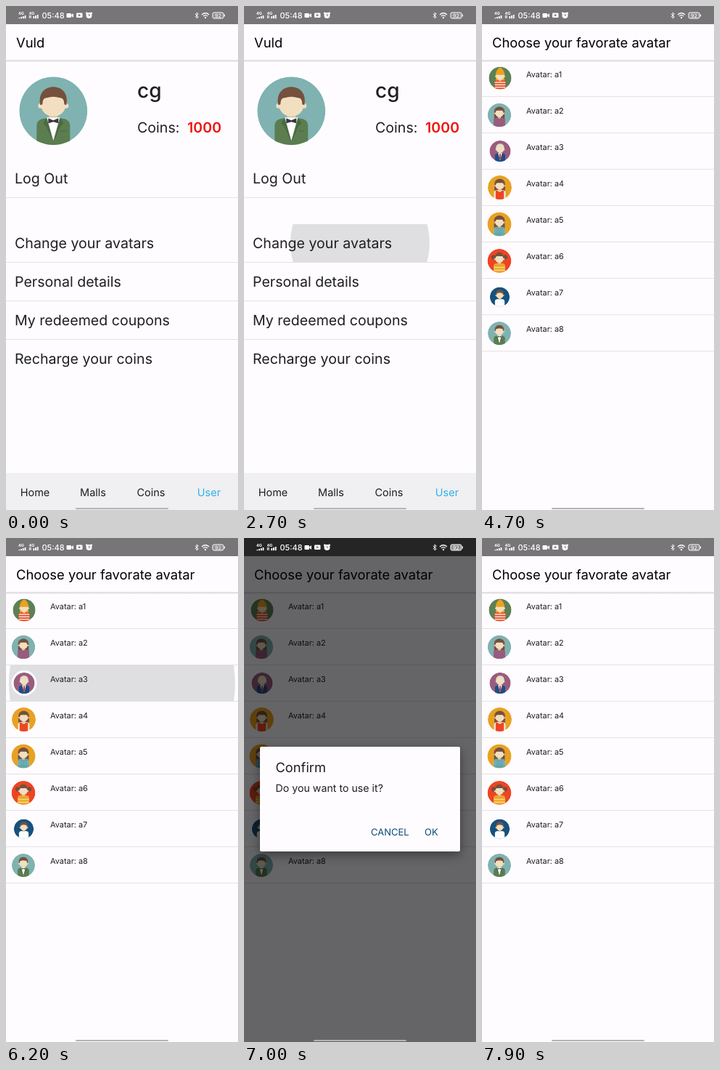
Write an HTML page that moves like this. It is 320 px wide and 693 px high and loops after 8 s.

```html
<!DOCTYPE html>
<html lang="en">
<head>
<meta charset="utf-8">
<title>Avatar picker</title>
<style>
  html, body { margin: 0; width: 100%; height: 100%; overflow: hidden; background: #fefcff; }
  svg { display: block; width: 100%; height: 100%; }
  text { font-family: Inter, Roboto, sans-serif; font-optical-sizing: none; text-rendering: geometricPrecision; fill: #1f1e21; }
  .item { font-size: 19.6px; }
  .title { font-size: 18.4px; fill: #000; }
  .tab { font-size: 14.5px; text-anchor: middle; }
  .small { font-size: 10.9px; }
  .button { font-size: 13px; fill: #0b4b72; }
  #status text { fill: #fff; }
</style>
</head>
<body>
<svg viewBox="0 0 320 693">
  <defs>
    <clipPath id="disc"><circle r="47"/></clipPath>
    <clipPath id="homeRow"><rect y="300" width="320" height="52"/></clipPath>
    <clipPath id="listRow"><rect y="175" width="320" height="49.5"/></clipPath>
    <linearGradient id="fall" x2="0" y2="1">
      <stop stop-color="#cfced1"/><stop offset="1" stop-color="#fefcff"/>
    </linearGradient>
    <pattern id="dots" width="6" height="6" patternUnits="userSpaceOnUse">
      <rect width="6" height="6" fill="#4f9aa0"/><circle cx="3" cy="3" r="1.5" fill="#e3efe9"/>
    </pattern>
  </defs>
  <g id="home"></g>
  <g id="list"></g>
  <rect id="dim" y="25" width="320" height="668" opacity="0"/>
  <g id="status"></g>
  <rect x="96" y="690" width="128" height="2" rx="1" fill="#b3b2b5"/>
  <g id="dialog"></g>
</svg>
<script>
const $ = id => document.getElementById(id);
const paper = '#fefcff';
const label = (x, y, s, cls, more = '') => `<text x="${x}" y="${y}" class="${cls}" ${more}>${s}</text>`;
const box = (x, y, w, h, fill, more = '') => `<rect x="${x}" y="${y}" width="${w}" height="${h}" fill="${fill}" ${more}/>`;
const path = (d, fill) => `<path d="${d}" fill="${fill}"/>`;
const dot = (x, y, r, fill) => `<circle cx="${x}" cy="${y}" r="${r}" fill="${fill}"/>`;
const rule = y => box(0, y - 0.5, 320, 1, '#e3e2e5');
const header = s => box(0, 25, 320, 50, paper) + box(0, 74.5, 320, 3, 'url(#fall)') + label(14, 57, s, 'title');

// Avatar parts, drawn on a disc of radius 47
const skin = '#f1dfc0', brown = '#75503c', green = '#5b7d50', lapel = '#4a6a42';
const shortHair = c => path('M-18-8C-21-24-12-33 0-33S21-24 18-8L15-9C15-15 13-18 9-18Q0-21-9-18C-13-18-15-15-15-9Z', c);
const longHair = path('M-21 24V-14C-21-40 21-40 21-14V24Z', brown);
const fringe = path('M-18-6C-21-42 21-42 18-6L15-12Q14-18 9-18H-9Q-14-18-15-12Z', brown);
const vest = path('M-9 9L0 41L9 9Z', '#fff');
const stripes = (c, ys) => ys.map(y => box(-22, y, 44, 4.5, c)).join('');

const avatars = [
  { x: 25, y: 99, r: 15.6, bg: '#5d8055', body: '#ee4826',
    back: path('M-18 18V-14H18V18Z', '#e8a32b'),
    front: stripes('#f6ead6', [16, 26, 36]) + path('M-19-13C-18-30-6-44 0-44S18-30 19-13Z', '#efa01e') },
  { x: 24, y: 150, r: 16.2, bg: '#7fb2b1', body: '#995b80', back: longHair, front: fringe },
  { x: 25, y: 199.5, r: 14.6, bg: '#9a5c7f', body: '#17518a',
    front: vest + path('M-3 11H3L4 32L0 39L-4 32Z', '#e23f2b') + shortHair('#e6dcc9') },
  { x: 24.5, y: 249.5, r: 16.5, bg: '#e9a122', body: '#f0e3cc', back: longHair,
    front: path('M-16 47V12H-9Q0 24 9 12H16V47Z', '#ee4524') + fringe },
  { x: 24, y: 300, r: 16.6, bg: '#e9a122', body: 'url(#dots)', back: longHair, front: fringe },
  { x: 24, y: 350.3, r: 16.4, bg: '#ee4424', body: '#eda526',
    back: dot(-23, -14, 9, brown) + dot(23, -14, 9, brown),
    front: stripes('#f5d58a', [24, 35]) + fringe },
  { x: 24.5, y: 400, r: 13.6, bg: '#16517f', body: '#fdfcfe', front: shortHair('#7c5139') },
  { x: 24, y: 450, r: 16, bg: '#7fb2b1', body: green,
    front: vest + path('M-10 10L-14 17L-10 21L0 43L-8 16Z', lapel) + path('M10 10L14 17L10 21L0 43L8 16Z', lapel)
      + path('M-7 10L0 13L7 10V17L0 15L-7 17Z', '#37373f') + box(10, 27, 8, 1.2, lapel) + shortHair(brown) }
];

const avatar = ({ x, y, r, bg, body, back = '', front }) =>
  `<g transform="translate(${x} ${y}) scale(${r / 47})"><g clip-path="url(#disc)">`
  + dot(0, 0, 47, bg) + back
  + path('M-23 47V21C-23 13-18 11-10 10H10C18 11 23 13 23 21V47Z', body)
  + path('M-6 2H6V11Q0 16-6 11Z', '#d8c19e')
  + dot(-17.5, -7, 3.5, skin) + dot(17.5, -7, 3.5, skin)
  + box(-17, -30, 34, 37.5, skin, 'rx="16"')
  + front + '</g></g>';

const rows = ['Change your avatars', 'Personal details', 'My redeemed coupons', 'Recharge your coins'];
const tabs = ['Home', 'Malls', 'Coins', 'User'];

$('home').innerHTML = box(0, 0, 320, 693, paper) + header('Vuld')
  + avatar({ ...avatars[7], x: 65.3, y: 144.2, r: 47 })
  + label(181, 126, 'cg', '', 'font-size="28" font-weight="500"')
  + label(181, 174, 'Coins:', 'item')
  + label(250, 174, '1000', 'item', 'font-weight="600" style="fill:#f0140c"')
  + '<circle id="homeRipple" cx="160" cy="326" fill="#dfdee1" clip-path="url(#homeRow)"/>'
  + label(12, 244, 'Log Out', 'item') + rule(263.5)
  + rows.map((s, i) => label(12, 333 + 53 * i, s, 'item') + (i < 3 ? rule(352.5 + 53 * i) : '')).join('')
  + box(0, 642, 320, 51, '#f0eff1')
  + tabs.map((s, i) => label(40 + 80 * i, 674, s, 'tab', i == 3 ? 'style="fill:#2db3ea"' : '')).join('');

$('list').innerHTML = box(0, 0, 320, 693, paper) + header('Choose your favorate avatar')
  + '<circle id="listRipple" cx="160" cy="200" fill="#dfdee1" clip-path="url(#listRow)"/>'
  + dot(25, 199.5, 17.5, paper)
  + avatars.map((a, i) => avatar(a) + label(61, 98 + 50 * i, 'Avatar: a' + (i + 1), 'small') + rule(124.5 + 50 * i)).join('');

$('dialog').innerHTML = box(22, 287, 276, 144, paper, 'rx="2" style="filter:drop-shadow(0 5px 7px rgba(0,0,0,.4))"')
  + '<circle id="okRipple" cx="258.5" cy="404.5" r="20" fill="#dfdee1"/>'
  + label(43.5, 322, 'Confirm', '', 'font-size="18.3"')
  + label(43.5, 349, 'Do you want to use it?', '', 'font-size="14.2"')
  + label(175, 409, 'CANCEL', 'button') + label(249, 409, 'OK', 'button');

const signal = (x, bars) => label(x, 12, '4G', '', 'font-size="5.6" font-weight="700"')
  + bars.map(i => box(x + 0.5 + i * 2.7, 16 - i, 1.8, 1.2 + i, '#fff')).join('');
const arc = (r, y) => `<path d="M${275 - r} ${y}Q275 ${y - r * 0.9} ${275 + r} ${y}" fill="none" stroke="#fff" stroke-width="1.3"/>`;

$('status').innerHTML = box(0, 0, 320, 25, '#777578') + '<rect id="shade" width="320" height="25" opacity="0"/>'
  + signal(17, [0, 1, 2, 3]) + signal(31.5, [2, 3, 4]) + label(31.5, 17.2, 'R', '', 'font-size="5.6" font-weight="700"')
  + label(49.5, 17, '05:48', '', 'font-size="11" font-weight="500"')
  + box(83.5, 10, 6.5, 6, '#fff', 'rx="1"') + path('M90.3 12L93 10.3V15.7L90.3 14Z', '#fff')
  + box(97, 9.5, 8.5, 6.5, '#fff', 'rx="1.2"') + path('M100 11L103.3 12.8L100 14.5Z', '#777578')
  + dot(114.5, 13, 4, '#fff') + dot(111.3, 9.8, 1.4, '#fff') + dot(117.7, 9.8, 1.4, '#fff')
  + '<path d="M114.5 10.8V13.2H116.2" fill="none" stroke="#777578"/>'
  + '<path d="M260.8 10.8L265.3 15L263 17V9L265.3 11L260.8 15.2" fill="none" stroke="#fff" stroke-width=".9"/>'
  + arc(5, 12) + arc(3, 14) + dot(275, 16, 1.2, '#fff')
  + '<rect x="285" y="9" width="15" height="8" rx="2" fill="#8f8e91" stroke="#fff"/>' + box(300.8, 11.5, 1.2, 3, '#fff')
  + label(292.5, 15.7, '92', '', 'font-size="7.2" text-anchor="middle"');

// Each track: [time in ms, value], held until the next entry
const tracks = {
  homeR:  [[0, 0], [2700, 96], [2800, 145], [2900, 163]],
  page:   [[0, 0], [3000, 0.2], [3100, 0.75], [3200, 1]],
  listR:  [[0, 0], [6000, 88], [6100, 130], [6200, 156], [6300, 163]],
  listA:  [[0, 1], [6300, 0.8], [6400, 0.3], [6500, 0]],
  dim:    [[0, 0], [6300, 0.25], [6400, 0.53], [6500, 0.6], [7700, 0.4], [7800, 0.12], [7900, 0]],
  dialog: [[0, 0], [6300, 0.6], [6400, 1], [7700, 0.5], [7800, 0]],
  ok:     [[0, 0], [7600, 0.7]]
};
const at = (name, t) => tracks[name].filter(k => k[0] <= t).pop()[1];
const set = (id, name, v) => $(id).setAttribute(name, v);

function draw(t) {
  const dim = at('dim', t), shown = at('dialog', t);
  set('homeRipple', 'r', at('homeR', t));
  set('list', 'opacity', at('page', t));
  set('listRipple', 'r', at('listR', t));
  set('listRipple', 'opacity', at('listA', t));
  set('dim', 'opacity', dim);
  set('shade', 'opacity', Math.min(0.68, dim * 1.28));
  set('dialog', 'opacity', shown);
  set('dialog', 'transform', `translate(160 359) scale(${0.9 + 0.1 * shown}) translate(-160 -359)`);
  set('okRipple', 'opacity', at('ok', t));
}

const start = performance.now();
function tick() {
  draw((performance.now() - start) % 8000);
  requestAnimationFrame(tick);
}
tick();
</script>
</body>
</html>
```
